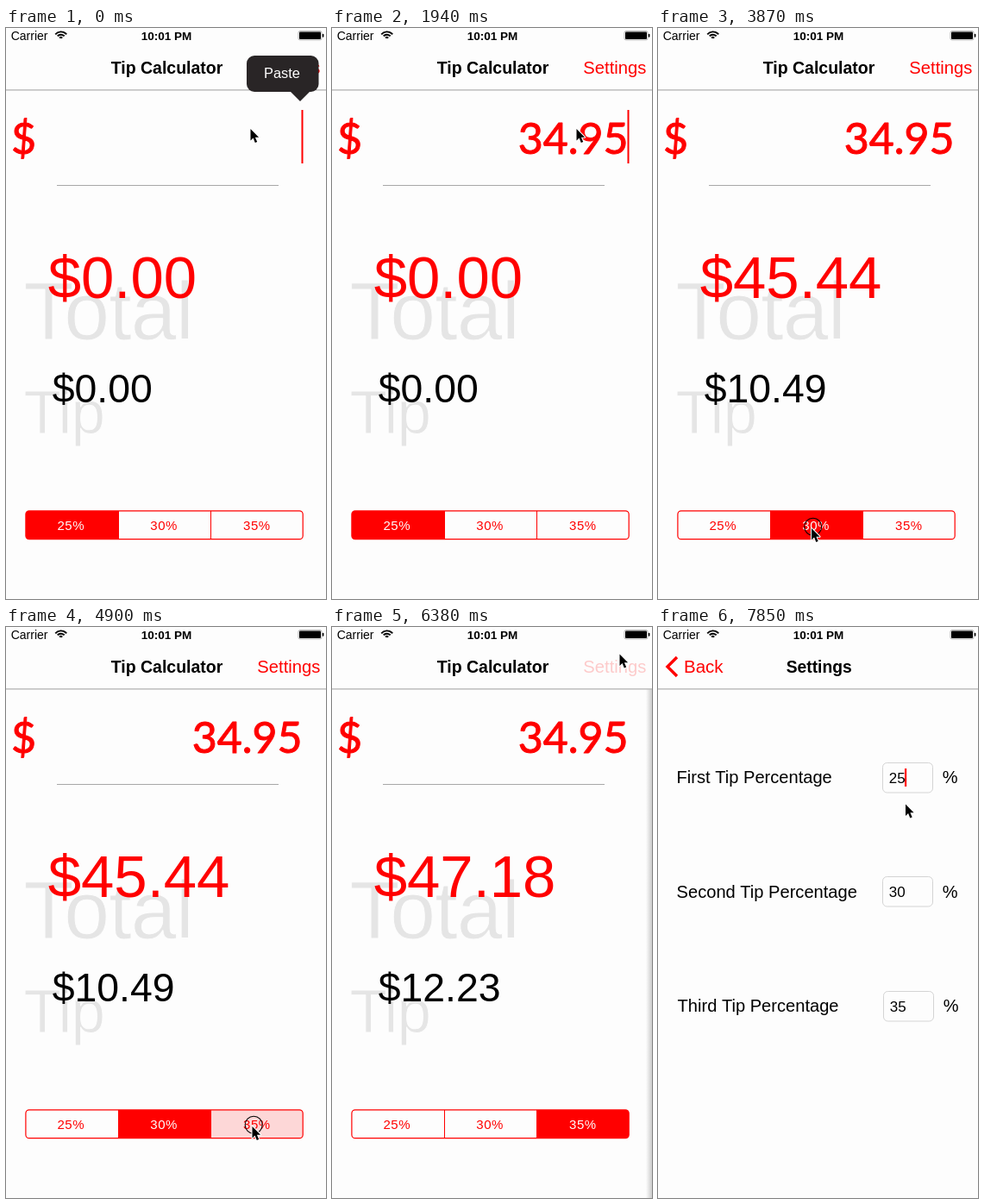
Animation of 371x662 px, one loop 8 s. Source, as an HTML page with a canvas:

```html
<!DOCTYPE html>
<html lang="en">
<head>
<meta charset="utf-8">
<title>Tip Calculator</title>
<style>
  html, body { margin: 0; width: 100%; height: 100%; overflow: hidden; background: #fdfdfd; }
  canvas { display: block; }
</style>
</head>
<body>
<canvas id="stage" width="371" height="662"></canvas>
<script>
const ctx = document.getElementById('stage').getContext('2d');
const W = 371, H = 662, NAV = 72, LOOP = 8000;
const RED = '#ff0000', PAPER = '#fdfdfd', GHOST = '#e5e5e5';
const SANS = '"Liberation Sans", Arial, sans-serif';
const GEOMETRIC = 'Lato, sans-serif';
const BILL = 34.95;
const RATES = [25, 30, 35];

// The screen refreshes at a steady tick; all times below count ticks.
const TICK = 148, LAST_TICK = 53;
const KEYSTROKES = [1, 3, 7, 10, 13];
// A tap shows at its tick, acts one tick later and is gone after two.
const TAP = { dismiss: 17, second: 25, third: 33, open: 41, focus: 49 };
const PUSH = TAP.open + 2;

// Pointer moves after its starting point.
const START = { x: 283.5, y: 117 };
const MOVES = [
  { from: 14, to: TAP.dismiss, x: 170, y: 350 },
  { from: 19, to: 22, x: 150, y: 531 },
  { from: 22, to: TAP.second - 1, x: 178, y: 580 },
  { from: 28, to: TAP.third - 1, x: 285.5, y: 579 },
  { from: 36, to: TAP.open, x: 333.5, y: 31.5 },
  { from: 46, to: TAP.focus, x: 295.5, y: 176.5 },
  { from: 52, to: LAST_TICK, x: 287, y: 205.5 }
];

const clamp = v => Math.max(0, Math.min(1, v));
const smooth = v => v * v * (3 - 2 * v);
const money = v => '$' + (Math.round(v * 100 + 1e-6) / 100).toFixed(2);

function pointerAt(tick) {
  return MOVES.reduce((at, move) => {
    const k = smooth(clamp((tick - move.from) / (move.to - move.from)));
    return { x: at.x + (move.x - at.x) * k, y: at.y + (move.y - at.y) * k };
  }, START);
}

// Critically damped spring.
function pushProgress(tick) {
  const s = Math.max(0, tick - PUSH) * 2.775;
  const p = 1 - (1 + s) * Math.exp(-s);
  return p > 0.99 ? 1 : p;
}

function text(str, x, y, size, color, o = {}) {
  ctx.font = `${o.weight || 400} ${size}px ${o.family || SANS}`;
  ctx.textAlign = o.align || 'left';
  ctx.letterSpacing = (o.spacing || 0) + 'px';
  ctx.fillStyle = color;
  ctx.fillText(str, x, y);
  if (o.outline) {
    ctx.strokeStyle = o.outlineColor || color;
    ctx.lineWidth = o.outline;
    ctx.lineJoin = 'round';
    ctx.strokeText(str, x, y);
  }
}

function rect(x, y, w, h, color) {
  ctx.fillStyle = color;
  ctx.fillRect(x, y, w, h);
}

function roundRect(x, y, w, h, r) {
  ctx.beginPath();
  ctx.roundRect(x, y, w, h, r);
}

function fill(color) {
  ctx.fillStyle = color;
  ctx.fill();
}

function stroke(color, width) {
  ctx.strokeStyle = color;
  ctx.lineWidth = width;
  ctx.stroke();
}

function trace(points) {
  ctx.beginPath();
  points.forEach(([x, y]) => ctx.lineTo(x, y));
}

function layer(draw, { x = 0, alpha = 1 }) {
  ctx.save();
  ctx.translate(x, 0);
  ctx.globalAlpha = clamp(alpha);
  draw();
  ctx.restore();
}

function drawSegments(tick) {
  const selected = tick > TAP.third ? 2 : tick > TAP.second ? 1 : 0;
  const pressed = [-1, TAP.second, TAP.third].indexOf(tick);
  const x0 = 22.9, y0 = 559.8, w = 321.3 / 3, h = 32.9;
  ctx.save();
  roundRect(x0, y0, w * 3, h, 4);
  ctx.clip();
  RATES.forEach((rate, i) => {
    const x = x0 + i * w;
    if (i === selected) rect(x, y0, w, h, RED);
    if (i === pressed) rect(x, y0, w, h, 'rgba(255,0,0,.15)');
    if (i) rect(Math.floor(x), y0, 1, h, RED);
    text(rate + '%', 75.3 + i * 107.8, 582, 15, i === selected ? PAPER : RED,
      { align: 'center', spacing: 0.6 });
  });
  ctx.restore();
  roundRect(x0, y0, w * 3, h, 4);
  stroke(RED, 1.2);
}

function drawCalculator(tick) {
  rect(0, NAV, W, H - NAV, PAPER);
  const dismissed = tick > TAP.dismiss;
  const rate = RATES[tick > TAP.third ? 2 : tick > TAP.second ? 1 : 0];
  const tip = dismissed ? BILL * rate / 100 : 0;
  const total = dismissed ? BILL + tip : 0;
  const typed = BILL.toFixed(2).slice(0, KEYSTROKES.filter(k => k <= tick).length);

  const input = { family: GEOMETRIC, outline: 1 };
  text('$', 6, 146, 50, RED, input);
  text(typed, 343.5, 146, 50, RED, { ...input, align: 'right' });
  if (!dismissed) rect(342.5, 95, 2, 62, RED);
  rect(59, 182, 257, 1, '#a8a8a8');

  const ghost = { outline: 0.9, outlineColor: PAPER, spacing: -0.8 };
  text('Total', 20.5, 360.5, 95, GHOST, ghost);
  text('Tip', 20.5, 470, 71, GHOST, ghost);
  text(money(total), 48.7, 312.5, 68.9, RED);
  text(money(tip), 53.7, 433.5, 46.4, '#000');
  drawSegments(tick);
}

function drawSettings(tick) {
  rect(0, NAV, W, H - NAV, PAPER);
  ['First', 'Second', 'Third'].forEach((name, i) => {
    const y = 181 + i * 132.5, dx = i === 2 ? 1 : 0;
    text(name + ' Tip Percentage', 21.6 + dx, y, 20.1, '#000');
    roundRect(260.5 + dx, Math.floor(y - 24) + 0.5, 58, 34.5, 5);
    stroke('#d4d4d4', 1);
    text(RATES[i], 267.8 + dx, y - 0.5, 17, '#000');
    text('%', 329.8 + dx, y, 20, '#000');
  });
  if (tick > TAP.focus) rect(286, 164, 2.2, 21, RED);
}

function drawBody(tick, p) {
  const edge = W * (1 - p);
  if (p < 1) {
    layer(() => drawCalculator(tick), { x: -0.3 * W * p });
    rect(0, NAV, W, H - NAV, `rgba(0,0,0,${0.1 * p})`);
  }
  if (tick < PUSH) return;
  const shadow = ctx.createLinearGradient(edge - 7, 0, edge, 0);
  shadow.addColorStop(0, 'rgba(0,0,0,0)');
  shadow.addColorStop(1, `rgba(0,0,0,${0.2 * (1 - p)})`);
  rect(edge - 7, NAV, 7, H - NAV, shadow);
  layer(() => drawSettings(tick), { x: edge });
}

function drawStatus() {
  text('Carrier', 5.7, 14, 14, '#000');
  text('10:01 PM', 186, 14, 13.5, '#000', { weight: 700, align: 'center' });
  for (const r of [8.6, 5.3, 2]) {
    ctx.beginPath();
    ctx.arc(63.7, 13, r, -Math.PI * 0.77, -Math.PI * 0.23);
    stroke('#000', 1.9);
  }
  roundRect(339, 3.5, 27, 10.5, 2);
  stroke('#999', 0.7);
  roundRect(340, 4.5, 25, 8.5, 1);
  fill('#000');
  roundRect(366.8, 6.8, 1.6, 4, 1);
  fill('#000');
}

function drawNav(tick, p) {
  rect(0, 0, W, NAV, PAPER);
  rect(0, 71.2, W, 1.4, '#b9b9b9');
  drawStatus();
  const title = { weight: 700, align: 'center' };
  layer(() => text('Tip Calculator', 186.5, 53, 19.5, '#000', title),
    { x: -97 * p, alpha: (1 - p) * 1.8 });
  layer(() => text('Settings', 364.3, 53, 20.2, RED, { align: 'right' }),
    { alpha: (tick >= TAP.open ? 0.2 : 1) * (1 - p) });
  layer(() => {
    text('Settings', 186.7, 53, 19.3, '#000', title);
    text('Back', 30, 53, 20.5, RED);
  }, { x: 60 * (1 - p), alpha: p });
  layer(() => {
    trace([[22, 35], [11, 46], [22, 57]]);
    ctx.lineJoin = 'miter';
    stroke(RED, 3.4);
  }, { alpha: p ** 20 });
}

function drawPopup(tick) {
  layer(() => {
    roundRect(279, 32, 83.5, 42, 9);
    fill('#292526');
    trace([[329.5, 73.5], [352.5, 73.5], [341, 85]]);
    fill('#292526');
    text('Paste', 320, 58, 16.4, '#fff', { align: 'center' });
  }, { alpha: 1 - tick / 2 });
}

function drawPointer(tick) {
  const { x, y } = pointerAt(tick);
  if (Object.values(TAP).some(tap => tick === tap || tick === tap + 1)) {
    ctx.beginPath();
    ctx.arc(x + 1.7, y - 1.7, 10, 0, Math.PI * 2);
    stroke('#000', 1.1);
  }
  ctx.save();
  ctx.translate(x, y);
  trace([[0, 0], [0, 13.4], [3.1, 10.6], [5.3, 16], [7.7, 15], [5.4, 9.8], [9.6, 9.8]]);
  ctx.closePath();
  ctx.lineJoin = 'round';
  stroke('#fff', 2);
  fill('#000');
  ctx.restore();
}

function render() {
  const tick = Math.min(LAST_TICK, Math.floor(performance.now() % LOOP / TICK));
  const p = pushProgress(tick);
  drawBody(tick, p);
  drawNav(tick, p);
  drawPopup(tick);
  drawPointer(tick);
  requestAnimationFrame(render);
}
render();
</script>
</body>
</html>
```
